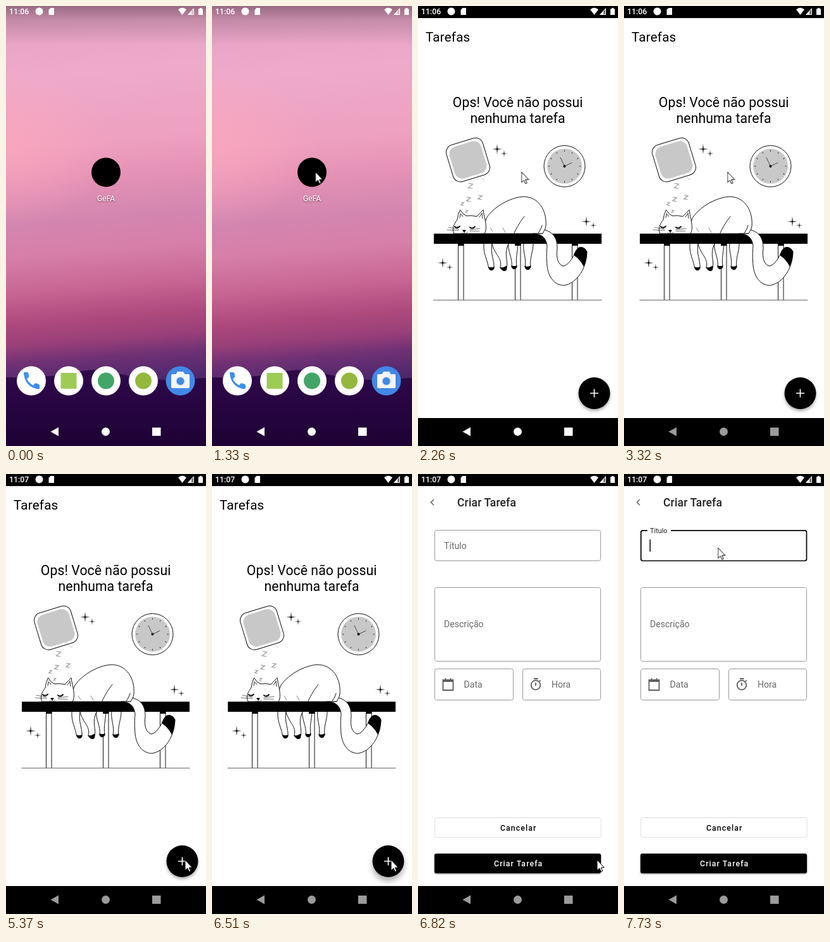
Recreate the animation shown at these times as an HTML page. Size 316 by 692 pixels, loop 8000 ms.

```html
<!DOCTYPE html>
<html lang="pt">
<head>
<meta charset="utf-8">
<title>Tarefas</title>
<style>
html, body { margin: 0; width: 100%; height: 100%; overflow: hidden; background: #000; }
svg { display: block; width: 100vw; height: 100vh; font-family: Roboto, "Noto Sans", sans-serif; }
.line { fill: none; stroke: #111; stroke-linecap: round; stroke-linejoin: round; }
.body { fill: #fff; stroke: #111; stroke-width: 1; stroke-linejoin: round; }
.field { fill: none; stroke: #9a9a9a; stroke-width: 1; }
.hint { fill: #6a6a6a; font-size: 14.1px; }
.icon { fill: none; stroke: #5f5f5f; stroke-width: 1.8; }
.button { font-weight: 500; font-size: 12.3px; letter-spacing: 1.1px; text-anchor: middle; }
.message { font-size: 21.2px; letter-spacing: .08px; text-anchor: middle; }
.status { fill: #fff; font-size: 12.3px; font-weight: 500; }
</style>
</head>
<body>
<svg viewBox="0 0 316 692" preserveAspectRatio="none">
  <defs>
    <linearGradient id="sky" x1="0" y1="0" x2=".035" y2="1">
      <stop offset="0" stop-color="#e6a2c4"/>
      <stop offset=".14" stop-color="#eeaaca"/>
      <stop offset=".3" stop-color="#eea0bf"/>
      <stop offset=".38" stop-color="#e492b5"/>
      <stop offset=".47" stop-color="#d386b0"/>
      <stop offset=".55" stop-color="#d67ea8"/>
      <stop offset=".63" stop-color="#c76593"/>
      <stop offset=".7" stop-color="#ae497d"/>
      <stop offset=".75" stop-color="#983f79"/>
      <stop offset=".79" stop-color="#6f3174"/>
      <stop offset=".86" stop-color="#47256a"/>
    </linearGradient>
    <radialGradient id="glow">
      <stop offset="0" stop-color="#fba8bd" stop-opacity=".75"/>
      <stop offset="1" stop-color="#fba8bd" stop-opacity="0"/>
    </radialGradient>
    <linearGradient id="ground" x1="0" y1="0" x2="0" y2="1">
      <stop offset="0" stop-color="#300a4b"/>
      <stop offset=".25" stop-color="#2a0645"/>
      <stop offset="1" stop-color="#1a002e"/>
    </linearGradient>
    <linearGradient id="scrim" x1="0" y1="0" x2="0" y2="1">
      <stop offset="0" stop-opacity=".34"/>
      <stop offset=".35" stop-opacity=".15"/>
      <stop offset="1" stop-opacity="0"/>
    </linearGradient>
  </defs>

  <g id="home">
    <rect width="316" height="692" fill="#e6a2c4"/>
    <g id="wallpaper">
      <rect y="17" width="316" height="692" fill="url(#sky)"/>
      <ellipse cx="0" cy="217" rx="170" ry="130" fill="url(#glow)"/>
      <path fill="url(#ground)" d="M0 584C30 585 60 584 85 580S125 572 145 572S190 584 230 587S290 586 316 585V720H0Z"/>
    </g>
    <rect width="316" height="62" fill="url(#scrim)"/>
    <g id="launcher">
      <circle id="app" cx="158" cy="261.5" r="23"/>
      <text x="158" y="306.5" font-size="12.3" fill="#fff" text-anchor="middle" style="text-shadow:0 1px 2px #0008">GeFA</text>
    </g>
    <g id="dock">
      <g fill="#fff">
        <circle cx="40" cy="589.5" r="23"/><circle cx="99" cy="589.5" r="23"/>
        <circle cx="158" cy="589.5" r="23"/><circle cx="217" cy="589.5" r="23"/>
      </g>
      <circle cx="275.5" cy="589.5" r="23" fill="#4288e6"/>
      <path fill="#3f8fee" d="M28 577.5Q27 576 29 576H33.5Q35 576 35.5 578L36.5 583L33 586.5Q36 593 43 596.5L46 593L51.5 594.5Q53 595 53 597V601Q53 603 51 602.5C37 601 29 591 28 577.5Z"/>
      <rect x="86.5" y="577" width="25" height="25" rx="1" fill="#9ccc55"/>
      <circle cx="158" cy="589.5" r="13" fill="#43a568"/>
      <circle cx="217" cy="589.5" r="13" fill="#94b83d"/>
      <path fill="#f5f5f5" d="M263 579H268.5L271 575H280L282.5 579H288Q290 579 290 581V599Q290 601 288 601H263Q261 601 261 599V581Q261 579 263 579Z"/>
      <circle cx="275.5" cy="590" r="6.8" fill="#4288e6" stroke="#dde4ee" stroke-width="1.5"/>
    </g>
    <g id="opening">
      <rect x="126" y="259" width="63" height="68" rx="29" fill="#4a4448"/>
      <path d="M143 263Q148 259 155 259H161Q169 259 173 263Z" fill="#2b0a40"/>
    </g>
  </g>

  <g id="screen">
    <rect width="316" height="692"/>
    <rect y="19" width="316" height="629" fill="#fff"/>
    <g id="list">
      <text x="12" y="56" font-size="20.6" letter-spacing=".2">Tarefas</text>
      <text class="message" x="157.6" y="159">Ops! Você não possui</text>
      <text class="message" x="157.6" y="184">nenhuma tarefa</text>

      <g transform="translate(79 242) rotate(-17)">
        <rect class="body" x="-30" y="-30" width="60" height="60" rx="12"/>
        <rect x="-26" y="-26" width="52" height="52" rx="12" fill="#c8c8c8"/>
      </g>
      <path class="line" stroke-width=".6" style="stroke:#aaa" d="M95 265Q99 271 105 273"/>
      <circle class="body" cx="231.5" cy="252" r="32.5"/>
      <circle cx="231.5" cy="252" r="27.5" fill="#c8c8c8"/>
      <g id="ticks" transform="translate(231.5 252)"></g>
      <path class="line" stroke-width=".7" d="M225 238.5L231.5 252L243 246.5"/>
      <circle cx="231.5" cy="252" r="2"/>
      <g id="sparkles"></g>
      <g id="snores" fill="none" stroke="#999"></g>

      <g class="body">
        <path d="M63.5 374V462.5H72V374M153.5 374V462.5H162V374M243.5 374V462.5H252V374"/>
        <path d="M104 374C103 391 110 399 111.5 412Q116 417 120 413C121 399 114 391 117 374"/>
        <path d="M117 374C121 391 134 397 130 411Q136 417 140 412C143 400 135 391 143 374"/>
        <path d="M143 374C141 384 150 397 148 411Q152 415 156 411C154 395 157 390 158 374"/>
        <path d="M167 374C165 385 172 398 169 411Q174 415 178 411C176 397 182 386 182 374"/>
      </g>
      <path d="M111 410Q116 412 120.500 410Q120 416 116 416Q112 416 111 410ZM129 411Q135 412 140 408.500Q142 417 136 417Q132 416 129 411ZM147.500 408Q152 410 156.500 408Q156 414 152 414Q148 414 147.500 408ZM168.500 409Q174 411 178.500 408Q178 415 174 415Q169 415 168.500 409Z"/>
      <path class="line" style="stroke:#666" d="M25 462.5H290"/>
      <path class="body" d="M104 358C105 345 106 338 109 332C122 314 146 302 164 300C191 298 204 323 202 346L199 358Z"/>
      <path class="line" d="M152 357C156 348 163 337 168 331M190 357C193 353 195 349 196 345"/>
      <path class="line" style="stroke:#888" d="M114 349L118 355M134 349L138 356"/>
      <path class="body" d="M57 358C53 350 57 343 62 336Q63 327 66.5 320.5Q70 327 76 330Q86 329 93 331L103 320.5Q104 328 106 336C108 347 108 353 105 358Z"/>
      <path class="line" stroke-width=".9" d="M67 327L66 333M67 327L71 331M101 326L97 332M101 326L102 334"/>
      <path class="line" stroke-width="2" d="M58 347Q62 350.5 66 346.5M82 348Q86 351.5 90 347"/>
      <path d="M70 353Q73 351 76 353L73 356Z"/>
      <path class="line" stroke-width=".6" d="M64 351L48 348M64 353L46 352M82 352L98 350M82 354L97 354M69 357Q72 359 73 356Q75 359 78 356"/>
      <path d="M25 358H290V374H25ZM63 374H72.5V377H63ZM153 374H162.5V377H153ZM243 374H252.5V377H243Z"/>
      <path class="body" d="M181 358C196 358 203 365 204 378C203 387 203 396 204 409C207 433 222 441 233 439C256 433 267 406 267 386Q258 374 250 384C245 396 238 407 230 409C221 407 218 396 220 381C220 365 214 356 200 352L197 358Z"/>
      <path d="M246 392C249 384 253 379 257 379Q264 379 267 386Q267 399 262 410Q256 398 246 392Z"/>

      <circle id="fab" cx="278.5" cy="609" r="25"/>
      <path d="M272 609H285M278.5 602.5V615.5" stroke="#fff" stroke-width="1.7"/>
    </g>

    <g id="form">
      <rect y="19" width="316" height="629" fill="#fff"/>
      <path d="M25 40L20.5 44.5L25 49" fill="none" stroke="#666" stroke-width="1.6"/>
      <text x="62" y="51" font-size="17.5" font-weight="500" letter-spacing=".15" fill="#222">Criar Tarefa</text>
      <rect class="field" x="26.5" y="88.5" width="262" height="48" rx="3"/>
      <rect id="focus" x="26.8" y="88.8" width="261.7" height="47.7" rx="3" fill="none" stroke="#000" stroke-width="1.7"/>
      <rect id="gap" x="37" y="86" width="37" height="5" fill="#fff"/>
      <text id="label" class="hint">Título</text>
      <rect id="caret" x="40.5" y="103" width="1.5" height="19"/>
      <rect class="field" x="26.5" y="178.5" width="262" height="116" rx="3"/>
      <text class="hint" x="41" y="241">Descrição</text>
      <rect class="field" x="26.5" y="306.5" width="124" height="49" rx="3"/>
      <text class="hint" x="72.5" y="336">Data</text>
      <rect class="field" x="165.5" y="306.5" width="123" height="49" rx="3"/>
      <text class="hint" x="211" y="336">Hora</text>
      <path class="icon" d="M39.5 324H55.5V340H39.5ZM39.5 326H55.5M43.5 321V324M51.5 321V324"/>
      <path class="icon" d="M183 322H189.5M186 328V333M192 326L193.5 324.5"/>
      <circle class="icon" cx="186" cy="332" r="7.3"/>
      <rect x="26.5" y="540.5" width="262.5" height="31" rx="3" fill="none" stroke="#e0e0e0"/>
      <text class="button" x="158.7" y="560.5">Cancelar</text>
      <rect x="26" y="597" width="263" height="31" rx="3" style="filter:drop-shadow(0 1px 1.5px #0007)"/>
      <text class="button" x="158.7" y="617" fill="#fff">Criar Tarefa</text>
    </g>
    <rect width="316" height="19"/>
    <rect y="648" width="316" height="44"/>
  </g>

  <g class="status">
    <text id="before" x="5" y="13">11:06</text>
    <text id="after" x="5" y="13">11:07</text>
    <circle cx="52.5" cy="8.5" r="6"/>
    <path d="M70.5 3H76V14H67.5V6Z"/>
    <path d="M278.5 14L272 5.5Q278.5 0 285 5.5Z"/>
    <path d="M297 3V14H287Z" opacity=".45"/>
    <path d="M293 7.5V14H287Z"/>
    <path d="M296.5 4V13.5H288Z" fill="none" stroke="#fff"/>
    <path d="M304 4.5H306V3H309V4.5H311V14H304Z"/>
  </g>
  <g id="nav" fill="#fff">
    <path d="M70.5 669.5L83 662.5V676.5Z"/>
    <circle cx="157.5" cy="669.5" r="6.5"/>
    <rect x="231" y="663" width="13.5" height="13"/>
  </g>
  <path id="cursor" d="M0 0V16.5L3.8 13L6.3 18.5L8.7 17.4L6.3 12H11.3Z" fill="#fff" stroke="#000" stroke-width="1" stroke-linejoin="round"/>
</svg>
<script>
const LOOP = 8000, STEP = 76;
const $ = id => document.getElementById(id);

// Each row is [time, value]; a value holds until the next row.
function play(id, prop, rows) {
  const frames = [...rows, [LOOP, rows.at(-1)[1]]].map(([t, value]) =>
    ({ offset: t / LOOP, [prop]: value, easing: 'step-end' }));
  $(id).animate(frames, { duration: LOOP, iterations: Infinity });
}
const show = (id, from, to = LOOP) => play(id, 'opacity',
  [...(from ? [[0, 0]] : []), [from, 1], ...(to < LOOP ? [[to, 0]] : [])]);
const at = (x, y, scale = 1) => `translate(${x}px,${y}px) scale(${scale})`;

// Cursor sweep along a cubic curve, in evenly timed jumps.
function sweep(start, count, points) {
  return Array.from({ length: count }, (_, i) => {
    const s = (i + 1) / count, u = s * s * (3 - 2 * s), v = 1 - u;
    const w = [v * v * v, 3 * v * v * u, 3 * v * u * u, u * u * u];
    const sum = axis => points.reduce((n, p, k) => n + p[axis] * w[k], 0);
    return [start + i * STEP, at(sum(0), sum(1))];
  });
}

function add(parent, d, attributes) {
  const path = document.createElementNS('http://www.w3.org/2000/svg', 'path');
  path.setAttribute('d', d);
  for (const key in attributes) path.setAttribute(key, attributes[key]);
  $(parent).append(path);
}
for (let a = 0; a < 360; a += 30)
  add('ticks', 'M0 -25.5V-23', { stroke: '#333', transform: `rotate(${a})` });
for (const [x, y, r] of [[125, 225, 8], [136, 232, 5.5], [266, 339, 8], [277, 345, 5.5], [39, 404, 8], [50, 411, 5.5]])
  add('sparkles', 'M0 -1L.1 -.1L1 0L.1 .1L0 1L-.1 .1L-1 0L-.1 -.1Z',
    { transform: `translate(${x} ${y}) scale(${r})` });
for (const [x, y, r] of [[83, 283, 4], [98, 301, 3.5], [80, 304, 3.5], [70, 311, 2.5], [77, 323, 2]])
  add('snores', 'M-.8 -1L.9 -.7L-.9 .7L.8 1',
    { transform: `translate(${x} ${y}) scale(${r})`, 'stroke-width': 1.2 / r });

play('cursor', 'transform', [
  [0, at(340, 137)],
  ...sweep(500, 11, [[318, 137], [60, 150], [10, 330], [163, 262.5]]),
  [1330, at(163.5, 261)],
  ...sweep(4540, 10, [[163.5, 261], [190, 330], [350, 600], [283, 607]]),
  ...sweep(6890, 5, [[283, 607], [270, 520], [165, 230], [147.5, 153]]),
  [7280, at(148, 128)], [7350, at(148.5, 116)]
]);

// Launching the app
play('app', 'fill', [[0, '#000'], [1560, '#161616'], [1635, '#242424'], [1710, '#2e2e2e']]);
show('launcher', 0, 2110);
play('wallpaper', 'transform', [[0, at(0, 0)], [1870, at(0, -4)], [2110, at(0, -12)], [2180, at(0, -17)]]);
play('dock', 'opacity', [[0, 1], [2110, .95], [2180, .88]]);
play('dock', 'transform', [[0, at(0, 0)], [2180, at(0, -1)]]);
show('opening', 2110);
play('opening', 'transform', [[0, at(34.7, 45, .78)], [2180, at(0, 0)]]);
show('screen', 2260);
play('nav', 'fill', [[0, '#fff'], [2640, '#e6e6e6'], [2870, '#cecece'], [3090, '#b5b5b5'], [3320, '#9b9b9b']]);

// Clock, button press and form
show('before', 0, 5370);
show('after', 5370);
const shadow = (y, blur) => `drop-shadow(0 ${y}px ${blur}px rgba(0,0,0,.32))`;
play('fab', 'filter', [[0, shadow(3, 2.5)], [6130, shadow(4, 3.5)], [6205, shadow(5, 4.5)], [6280, shadow(6, 5)]]);
play('form', 'opacity', [[0, 0], [6590, .4], [6670, .85], [6740, 1]]);
play('form', 'transform', [[0, at(0, 24)], [6670, at(0, 8)], [6740, at(0, 2)], [6820, at(0, 0)]]);

// Title field focus
show('focus', 7510);
show('gap', 7580);
show('caret', 7580);
play('label', 'transform', [[0, at(41, 118)], [7510, at(41, 114, .96)], [7580, at(41, 104, .87)], [7660, at(41, 95, .79)], [7730, at(41, 93, .77)]]);
play('label', 'fill', [[0, '#6a6a6a'], [7580, '#444'], [7730, '#222']]);
</script>
</body>
</html>
```
